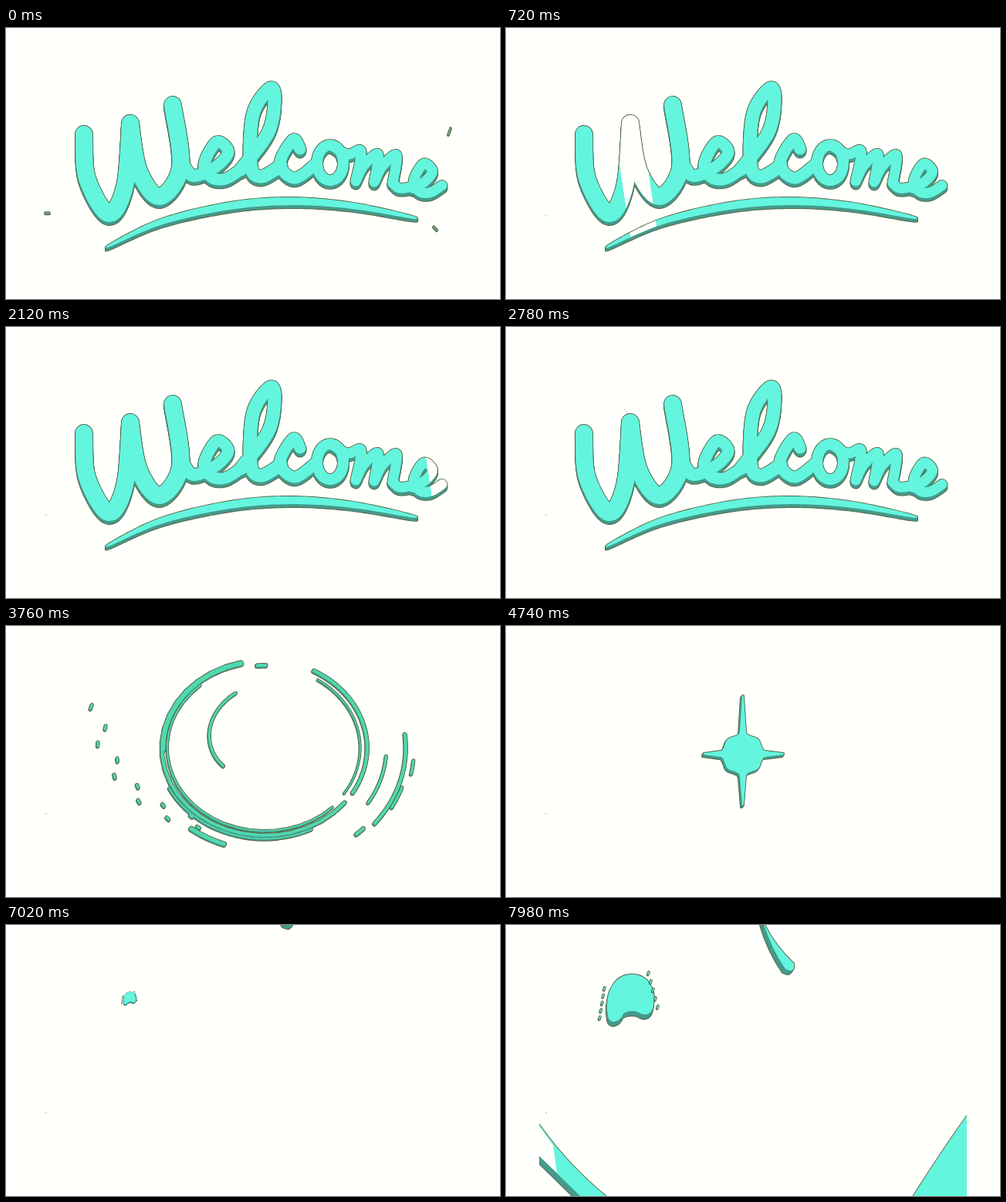
An HTML page with a canvas for the animation above (8000 ms loop, 640 px wide and 352 px high).

```html
<!DOCTYPE html>
<html lang="en">
<head>
<meta charset="utf-8">
<title>Welcome</title>
<style>
  html, body { margin: 0; width: 100%; height: 100%; overflow: hidden; background: #fffffb; }
  canvas { display: block; width: 640px; height: 352px; }
</style>
</head>
<body>
<canvas width="640" height="352" role="img" aria-label="Welcome"></canvas>
<script>
const ctx = document.querySelector('canvas').getContext('2d');
const LOOP = 8000, FACE = '#64f5df', SIDE = '#449a8b', EDGE = '#56633f', BACK = '#fffffb';
const clamp = v => Math.max(0, Math.min(1, v));
const ramp = (t, a, b) => clamp((t - a) / (b - a));
const easeOut = u => 1 - (1 - u) ** 3;
const easeInOut = u => u * u * (3 - 2 * u);
const range = (n, make) => Array.from({ length: n }, (_, i) => make(i));

// Smooth curve through a few [x, y] pairs given as a flat list.
function spline(...flat) {
  const n = flat.length / 2 - 1, steps = 14;
  const at = i => {
    const k = Math.max(0, Math.min(n, i)) * 2;
    return [flat[k], flat[k + 1]];
  };
  return range(n * steps + 1, k => {
    const i = Math.min(n - 1, Math.floor(k / steps)), u = k / steps - i;
    const [p, q, r, s] = [at(i - 1), at(i), at(i + 1), at(i + 2)];
    return [0, 1].map(c => q[c] + 0.5 * u * (r[c] - p[c]
      + u * (2 * p[c] - 5 * q[c] + 4 * r[c] - s[c]
      + u * (3 * (q[c] - r[c]) + s[c] - p[c]))));
  });
}

function toPath(points, closed) {
  const path = new Path2D();
  points.forEach(([x, y]) => path.lineTo(x, y));
  if (closed) path.closePath();
  return path;
}

const stroke = (points, width) => ({ path: toPath(points), width });
const shape = path => ({ path: typeof path === 'string' ? new Path2D(path) : path, solid: true });

// Outline, extruded side and face, each painted for all parts before the next.
function extrude(parts, { dx = 0, dy = 4, face = FACE } = {}) {
  const pass = (color, grow, u) => {
    ctx.save();
    ctx.translate(dx * u, dy * u);
    ctx.fillStyle = ctx.strokeStyle = color;
    for (const { path, width, solid } of parts) {
      if (solid) ctx.fill(path);
      ctx.lineWidth = solid ? Math.max(0.1, grow) : Math.max(0.5, width + grow);
      if (!solid || grow > 0) ctx.stroke(path);
    }
    ctx.restore();
  };
  const steps = Math.ceil(Math.hypot(dx, dy));
  for (let i = steps; i >= 0; i--) pass(EDGE, 1.8, i / steps);
  for (let i = steps; i > 0; i--) pass(SIDE, 0, i / steps);
  pass(face, 0, 0);
}

const move = (points, x, y, k = 1) => points.map(p => [x + p[0] * k, y + p[1] * k]);
const letterE = spline(-16, 17, 4, 5, 16, -12, 1, -24, -15, 4, -6, 22, 12, 24, 32, 12);
const hump = spline(0, 33, 10, 14, 28, 0, 23, 36);
const oval = range(41, i => [420 + 17 * Math.cos(i * Math.PI / 20), 175 + 23 * Math.sin(i * Math.PI / 20)]);

const letters = [
  [22, spline(101, 138, 105, 195, 133, 241, 154, 205, 161, 124)],
  [22, spline(161, 124, 172, 185, 199, 219, 226, 180, 216, 100)],
  [16, spline(227, 172, 240, 191, 256, 189)],
  [15, move(letterE, 272, 172)],
  [17, spline(304, 184, 340, 135, 348, 90, 341, 79, 320, 112, 317, 177, 330, 193, 356, 179)],
  [15, spline(381, 157, 372, 145, 355, 176, 374, 195, 402, 176)],
  [14, oval],
  [13, spline(424, 154, 443, 164, 460, 160, 453, 199)],
  [13, move(hump, 454, 164)],
  [13, move(hump, 478, 165)],
  [13, spline(501, 201, 510, 208, 528, 206)],
  [13, move(letterE, 540, 195, 0.78)]
];
const underline = spline(129, 285, 200, 252, 290, 231, 370, 225, 450, 231, 533, 247);

function drawWelcome(t) {
  const gone = easeInOut(ramp(t, 3000, 3460));
  const cut = points => points.slice(Math.floor(gone * (points.length - 1)));
  const parts = letters.map(([width, points]) => stroke(cut(points), width * (1 - gone / 2)));
  const n = underline.length - 1;
  const rim = side => underline.map(([x, y], i) =>
    [x, y + side * (0.6 + 4.6 * Math.sqrt(Math.abs(Math.sin(Math.PI * i / n))))]);
  parts.push(shape(toPath([...cut(rim(-1)), ...cut(rim(1)).reverse()], true)));

  const shift = (t - 1520) * 0.45;
  const face = ctx.createLinearGradient(0, 176, 640, 80);
  face.addColorStop(0, FACE);
  for (const [from, to] of [[286, 328], [507, 543]]) {
    const a = clamp((from + shift) / 654), b = clamp((to + shift) / 654);
    face.addColorStop(a, FACE);
    face.addColorStop(a, BACK);
    face.addColorStop(b, BACK);
    face.addColorStop(b, FACE);
  }
  extrude(parts, { face });
}

// Arc rows: start angle, end angle, radius, width, end radius.
function arcParts(rows, { x, y, scale, flat, turn = 0, grow = 1, thin = 1 }) {
  return rows.map(([a, b, r, width, r2 = r]) => stroke(range(25, i => {
    const u = i / 24 * grow;
    const angle = (a + (b - a) * u + turn) * Math.PI / 180;
    const radius = (r + (r2 - r) * u) * scale;
    return [x + Math.cos(angle) * radius, y + Math.sin(angle) * radius * flat];
  }), width * thin));
}

const swirl = [
  [45, 263, 133, 4], [52, 235, 126, 2], [70, 160, 138, 2], [185, 263, 131, 5],
  [-55, 37, 133, 4], [-50, 40, 124, 1.5], [252, 159, 91, 3, 60],
  [11, 38, 158, 3], [0, 45, 183, 4], [25, 35, 188, 3], [12, 18, 194, 3],
  [50, 54, 177, 4], [116, 134, 155, 5], [272, 277, 125, 4]
];
const flecks = range(11, i => {
  const angle = 201 - 7 * i, r = 225 - 8.5 * i + (i % 2 ? -8 : 8);
  return [angle, angle + 1.5, r, 3];
});

function drawSwirl(t) {
  const into = easeOut(ramp(t, 3340, 3760)), out = easeInOut(ramp(t, 3760, 4400));
  extrude(arcParts([...swirl, ...flecks], {
    x: 335 - 28 * out, y: 158 + 9 * out, flat: 0.857,
    scale: (0.7 + 0.3 * into) * (1 - 0.92 * out),
    turn: (t - 3760) * 0.22, grow: into, thin: 1 - 0.4 * out
  }), { dx: -0.7, dy: 1.5, face: '#4fd8b0' });
}

function drawStar(t) {
  const size = easeOut(ramp(t, 4300, 4640)) * (1 - easeInOut(ramp(t, 5300, 5600)));
  const reach = easeOut(ramp(t, 4500, 4740)) * (1 - easeInOut(ramp(t, 4860, 5260)));
  const x = 307, y = 166, r = 26 * size, w = 4 * size;
  const ball = toPath(range(72, i => {
    const a = i * Math.PI / 36, bump = r * (1 + 0.035 * Math.cos(8 * a));
    return [x + Math.cos(a) * bump * 1.04, y + Math.sin(a) * bump];
  }), true);
  const spikes = [53, 67, 51, 76].map((length, i) => {
    const ux = [1, 0, -1, 0][i], uy = [0, 1, 0, -1][i];
    const at = (l, s) => [x + ux * l - uy * s, y + uy * l + ux * s];
    const tip = r + (length - 26) * reach * size;
    return shape(toPath([at(r - 6, -w - 3), at(r + 3, -w), at(tip, -1),
      at(tip, 1), at(r + 3, w), at(r - 6, w + 3)], true));
  });
  extrude([shape(ball), ...spikes], { dx: -2, dy: 3 });
}

const burst = [[235, 259], [271, 274], [302, 338], [349, 388],
  [45, 78], [95, 98], [108, 130], [168, 215]].map(([a, b]) => [a, b, 41, 5]);
const specks = range(3, i => [150 - 40 * i, 154 - 40 * i, 17 - 4 * i, 1]);

function drawBurst(t) {
  const scale = 0.35 + 0.65 * easeOut(ramp(t, 5520, 6000)) + 0.6 * easeOut(ramp(t, 6000, 6540));
  extrude(arcParts([...burst, ...specks], {
    x: 310, y: 166, flat: 0.92, scale, turn: (t - 6000) * 0.03, thin: 1 - ramp(t, 6050, 6540)
  }), { dx: -0.5, dy: 2, face: '#55d9bb' });
}

const dome = shape('M132 117C127 84 143 64 163 64C184 64 195 83 191 104C189 117 180 119 171 113Q160 110 152 115C148 127 133 130 132 117Z');
const drop = shape('M332 -8Q344 22 373 50Q375 64 362 57Q342 28 332 -8Z');
const slope = shape('M43 259Q82 314 132 354H98L43 300Z');
const glint = new Path2D('M43 261L61 286L66 322L43 300Z');
const hill = shape('M600 244Q570 285 525 356H600Z');
const chips = range(10, i => {
  const k = i % 5, x = i < 5 ? 127 - 1.5 * k : 184 + 3 * k, y = i < 5 ? 84 + 9.5 * k : 64 + 11 * k;
  return stroke([[x, y], [x + 1, y - 3]], 1.5);
});

function drawFinale(t) {
  const u = easeOut(ramp(t, 6900, 7980));
  const moved = (dx, dy, paint) => {
    ctx.save();
    ctx.translate(dx * (1 - u), dy * (1 - u));
    paint();
    ctx.restore();
  };
  ctx.save();
  ctx.beginPath();
  ctx.rect(43, 0, 554, 352);
  ctx.clip();
  moved(0, -80, () => extrude([drop], { dx: -4, dy: 5 }));
  moved(90, 120, () => extrude([hill], { dy: 1 }));
  moved(-100, 110, () => {
    extrude([slope], { dx: -3, dy: 7 });
    ctx.fillStyle = BACK;
    ctx.fill(glint);
  });
  ctx.translate(160 * (1 - u), 95 * (1 - u));
  ctx.scale(u, u);
  extrude([dome], { dx: -1, dy: 6 });
  extrude(chips, { dx: -0.5, dy: 1 });
  ctx.restore();
}

function drawStrays(t) {
  const u = ramp(t, 0, 420), k = 1 - u;
  const stray = (x, y, dx, dy, way) => {
    const px = x + way * 22 * u;
    return stroke([[px, y], [px + dx * k, y + dy * k]], 1.5 * k);
  };
  extrude([stray(51, 240, 5, 0, -1), stray(573, 138, 3, -8, 1), stray(554, 258, 4, 4, 1)],
    { dy: 1.5, face: '#8aa982' });
}

// Seventeen even steps, then a short hold, in each 840 ms stretch.
function stepped(t) {
  const u = (t + 20) % 840;
  return Math.max(0, t - u + Math.min(17, Math.floor(u / 43.5)) * 43.5);
}

function draw(now) {
  const t = stepped(now % LOOP);
  ctx.fillStyle = BACK;
  ctx.fillRect(0, 0, 640, 352);
  ctx.lineCap = ctx.lineJoin = 'round';
  if (t < 420) drawStrays(t);
  else {
    ctx.fillStyle = '#d8d43a';
    ctx.fillRect(51, 243, 1.5, 1.5);
  }
  if (t < 3460) drawWelcome(t);
  if (t > 3340 && t < 4400) drawSwirl(t);
  if (t > 4300 && t < 5600) drawStar(t);
  if (t > 5520 && t < 6540) drawBurst(t);
  if (t > 6900) drawFinale(t);
}

function tick() {
  draw(performance.now());
  requestAnimationFrame(tick);
}
tick();
</script>
</body>
</html>
```
